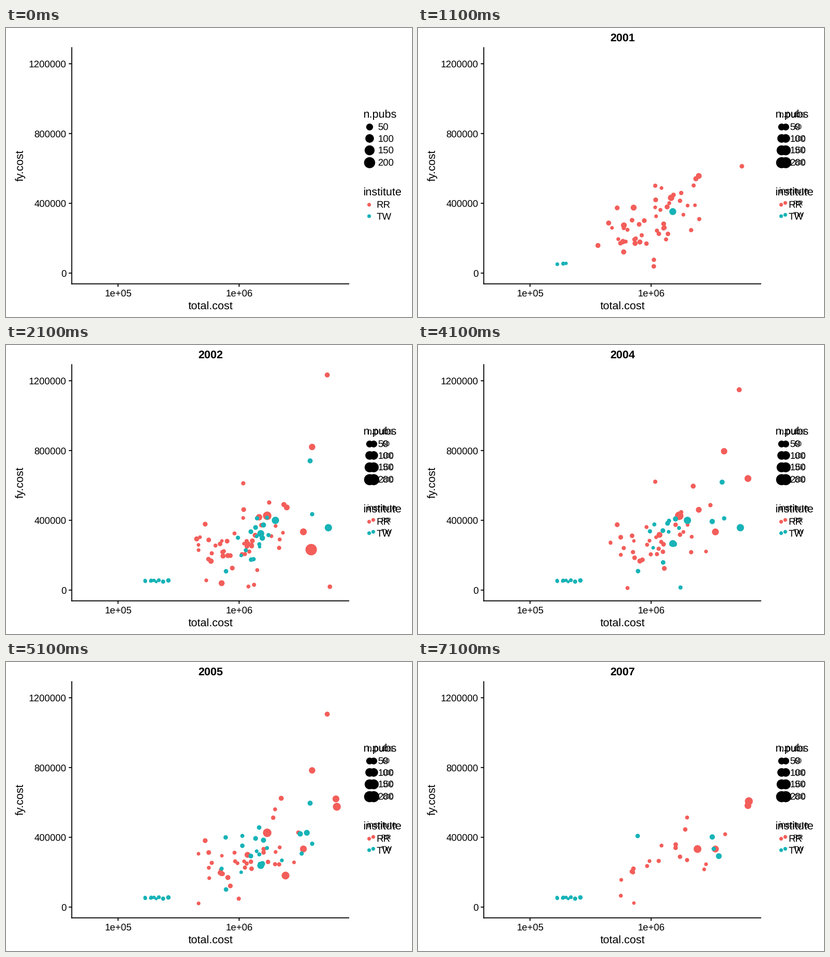
A matplotlib script for the animation above (8000 ms loop, 886 px wide and 632 px high).

```python
import math
import random

import matplotlib.pyplot as plt
from matplotlib.animation import FuncAnimation

W, H, DPI = 886, 632, 100
RR, TW = "#F35E5A", "#17B3B7"
FIRST, LAST = 2000, 2007
ZERO_Y = 536  # pixel row of zero yearly cost

plt.rcParams["font.family"] = "Liberation Sans"
plt.rcParams["text.hinting"] = "none"
fig = plt.figure(figsize=(W / DPI, H / DPI), dpi=DPI, facecolor="white")
ax = fig.add_axes([0, 0, 1, 1])
ax.set(xlim=(0, W), ylim=(H, 0))
ax.axis("off")

rng = random.Random(11)
dots = {(year, tone): [] for year in range(FIRST, LAST + 1)
        for tone in (RR, TW)}


def radius(pubs):
    return 2.9 + 0.65 * math.sqrt(pubs)


def clamp(v, low, high):
    return max(low, min(v, high))


def run_grant(tone, x, r, first, last, y_at):
    """Show a grant in every year it runs; its total cost never changes."""
    for year in range(first, min(last, LAST) + 1):
        dots[year, tone].append((x, y_at(year), r))


def typical_grant(tone, first, years, mean_x, spread):
    """Yearly cost grows with total cost and wobbles from year to year."""
    x = clamp(rng.gauss(mean_x, spread), 392, 719)
    r = min(radius(9 * math.exp(rng.gauss(0, 0.75))), 7)
    level = 75 * math.exp((x - 400) / 317 + rng.gauss(0, 0.28))
    last = first + years

    def y_at(year):
        if year == last and rng.random() < 0.3:  # last money runs out
            return ZERO_Y - rng.uniform(4, 50)
        return ZERO_Y - min(level * rng.uniform(0.88, 1.12), 310)

    run_grant(tone, x, r, first, last, y_at)


# half of the red grants already run at the start
for k in range(84):
    first = FIRST if k % 2 else rng.randint(2001, 2006)
    typical_grant(RR, first, rng.randint(1, 5), 505 + 13 * (first - FIRST), 66)
for k in range(26):
    first = rng.choice((2002, 2002, 2004, 2005))
    typical_grant(TW, first, rng.randint(1, 4), 540, 60)

# small teal grants in the lower left
for k in range(9):
    y = ZERO_Y - rng.uniform(18, 22)
    run_grant(TW, rng.uniform(293, 359), rng.uniform(3, 4.9),
              2000 if k < 3 else 2002, LAST, lambda year, y=y: y)

# the most visible grants: x, radius, years, yearly cost from y0 to y1
MAIN = [
    (RR, 701, 5.5, 2002, 2005, 65.5, 114),
    (RR, 668, 7, 2002, 2005, 223, 237),
    (RR, 666, 12.5, 2002, 2003, 447.5, 523.5),
    (RR, 570, 9.3, 2002, 2005, 373.5, 373.5),
    (RR, 649, 7.5, 2002, 2007, 408.5, 409),
    (RR, 610, 8.5, 2005, 2007, 467, 409),
    (RR, 720, 7.5, 2004, 2007, 292, 314),
    (RR, 722, 8.7, 2005, 2007, 316.5, 304.5),
    (TW, 703.5, 8, 2002, 2004, 399.5, 399.5),
    (TW, 588, 8, 2002, 2004, 383.5, 383.5),
    (TW, 556, 7.6, 2001, 2005, 401.5, 445),
    (TW, 656.5, 6.4, 2005, 2007, 373.5, 424.5),
]
for tone, x, r, a, b, y0, y1 in MAIN:
    run_grant(tone, x, r, a, b,
              lambda year, a=a, b=b, y0=y0, y1=y1:
              y0 + (y1 - y0) * (year - a) / (b - a))


def area(r):
    return (2 * r * 72 / DPI) ** 2


def text(x, y, s, size, **kw):
    return ax.text(x, y, s, fontsize=size * 72 / DPI, va="baseline", **kw)


def line(xs, ys):
    ax.plot(xs, ys, color="black", lw=2.1 * 72 / DPI,
            solid_capstyle="butt", snap=False)


def scatter(xs, ys, radii, colour):
    return ax.scatter(xs, ys, s=[area(r) for r in radii], c=colour,
                      linewidths=0, zorder=3)


def legend(x, size, label_size, size_x, size_label, inst_x, inst_label,
           title_y, inst_y, key_y):
    """Draw both keys and return their artists."""
    half = 0.358 * label_size
    made = [text(x, title_y, "n.pubs", size),
            text(x, inst_y, "institute", size)]
    for pubs, y in zip((50, 100, 150, 200), (215.5, 241, 266.5, 293.5)):
        made.append(scatter([size_x], [y], [radius(pubs)], "black"))
        made.append(text(size_label, y + half, str(pubs), label_size))
    for y, s, tone in zip((key_y, key_y + 25.5), ("RR", "TW"), (RR, TW)):
        made.append(scatter([inst_x], [y], [4.1], tone))
        made.append(text(inst_label, y + half, s, label_size))
    return made


# axes
line([143.5, 143.5], [42, 560.5])
line([142.5, 749], [559.5, 559.5])
for k in range(4):
    y = ZERO_Y - 152.6 * k
    line([137, 143], [y, y])
    text(131.5, y + 7.5, str(400000 * k), 21, ha="right")
for x, s in ((244.5, "1e+05"), (508.7, "1e+06")):
    line([x, x], [560, 566])
    text(x, 587, s, 21, ha="center")
text(446.5, 615, "total.cost", 24.4, ha="center")
text(37.5, 300.5, "fy.cost", 24.4, ha="center", rotation=90,
     rotation_mode="anchor")

legend(779, 24.4, 21, 793.5, 811.5, 792, 808.5, 196, 366, 385.5)
overlay = legend(787.5, 19.2, 15.4, 802.5, 820.5, 801, 818.5, 195, 362, 382)
title = text(446.2, 30, "", 24.4, ha="center", weight="bold")
clouds = {tone: scatter([], [], [], tone) for tone in (RR, TW)}


def draw(i):
    # one empty step, then a hard cut to the next year every second
    year = FIRST + (i - 1) // 10 if i else None
    title.set_text(str(year) if year else "")
    for artist in overlay:
        artist.set_visible(year is not None)
    for tone, cloud in clouds.items():
        rows = dots.get((year, tone), [])
        cloud.set_visible(bool(rows))
        if rows:
            cloud.set_offsets([(x, y) for x, y, _ in rows])
            cloud.set_sizes([area(r) for _, _, r in rows])
    return [title, *overlay, *clouds.values()]


anim = FuncAnimation(fig, draw, frames=80, interval=100, repeat=True,
                     repeat_delay=0, blit=False)
plt.show()
```
